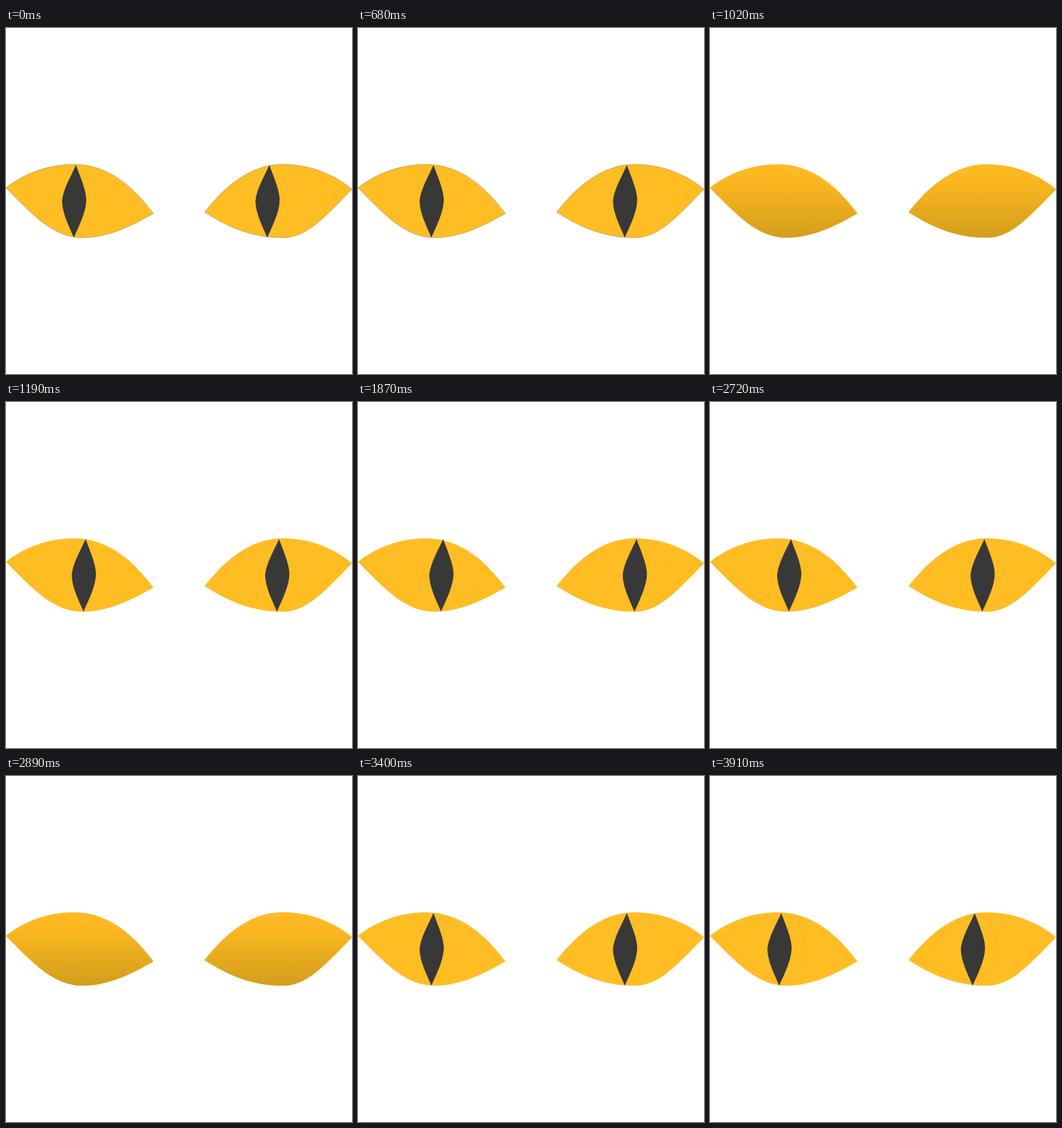
Animation of 500x500 px, one loop 4.08 s. Source, as an HTML page without scripts:

```html
<!DOCTYPE html>
<html lang="en">
<head>
<meta charset="utf-8">
<title>Cat eyes</title>
<style>
  html, body { margin: 0; width: 100%; height: 100%; overflow: hidden; background: #fff; }
  svg { display: block; width: 100%; height: 100%; }

  .eye { fill: #ffbd24; }
  .rim { fill: none; stroke: #555; stroke-width: .6; opacity: .55; }
  .pupil { fill: #383838; }
  .lid { fill: url(#shade); visibility: hidden; }
  .crease { fill: none; stroke: #c98f14; stroke-width: .7; stroke-dasharray: 3 2; visibility: hidden; }

  .pupil, .lid, .rim, .crease { animation: 4080ms -1ms step-end infinite; }
  .pupil { animation-name: glance; animation-timing-function: steps(12, end); }
  .lid { animation-name: blink; animation-duration: 2040ms; }
  .rim { animation-name: rim; }
  .wide { animation-name: wide; }
  .near { animation-name: near; }

  @keyframes glance { 50% { transform: translateX(24px); } }
  @keyframes blink {
    41.667% { visibility: visible; }
    58.333% { visibility: hidden; }
  }
  @keyframes rim { 20.833%, 100% { visibility: hidden; } }
  @keyframes wide {
    41.667% { visibility: visible; opacity: .25; }
    58.333% { visibility: visible; opacity: .6; }
    62.5% { visibility: hidden; }
  }
  @keyframes near {
    4.167% { visibility: visible; opacity: .5; }
    8.333% { visibility: hidden; }
    95.833%, 100% { visibility: visible; opacity: .5; }
  }
</style>
</head>
<body>
<svg viewBox="0 0 500 500">
  <defs>
    <linearGradient id="shade" x1="0" y1="0" x2="0" y2="1">
      <stop offset="0" stop-color="#ffbb22"/>
      <stop offset=".3" stop-color="#f8b520"/>
      <stop offset="1" stop-color="#d39d1c"/>
    </linearGradient>
    <path id="left" d="M0 231C25 211 60 197 98 197C150 197 187 233 213 268C185 284 150 303 110 303C70 303 40 272 0 231Z"/>
    <path id="right" d="M500 233C475 212 440 197 400 197C350 197 313 233 287 266C315 284 350 303 400 303C432 303 455 280 500 233Z"/>
    <g id="eyes"><use href="#left"/><use href="#right"/></g>
    <path id="slit" d="M101 198C106 212 116 234 116 248C116 266 105 287 98 303C92 288 81 268 81 250C82 234 94 214 101 198Z"/>
    <path id="inner" d="M108 203C75 207 50 220 33 232C55 255 80 286 112 297M393 203C360 215 335 245 320 266C340 280 370 292 392 298"/>
    <path id="outer" d="M159 202C168 220 172 240 174 252C175 268 167 284 158 294M435 203C443 222 452 240 452 252C452 268 443 284 434 292"/>
  </defs>

  <use class="eye" href="#eyes"/>
  <use class="rim" href="#eyes"/>

  <g class="crease wide">
    <use href="#inner"/>
    <use href="#outer"/>
  </g>
  <g class="crease near">
    <use href="#inner" x="-15.5"/>
    <use href="#outer" x="-36"/>
  </g>

  <g class="pupil">
    <use href="#slit"/>
    <use href="#slit" x="279.5"/>
  </g>

  <use class="lid" href="#eyes"/>
</svg>
</body>
</html>
```
